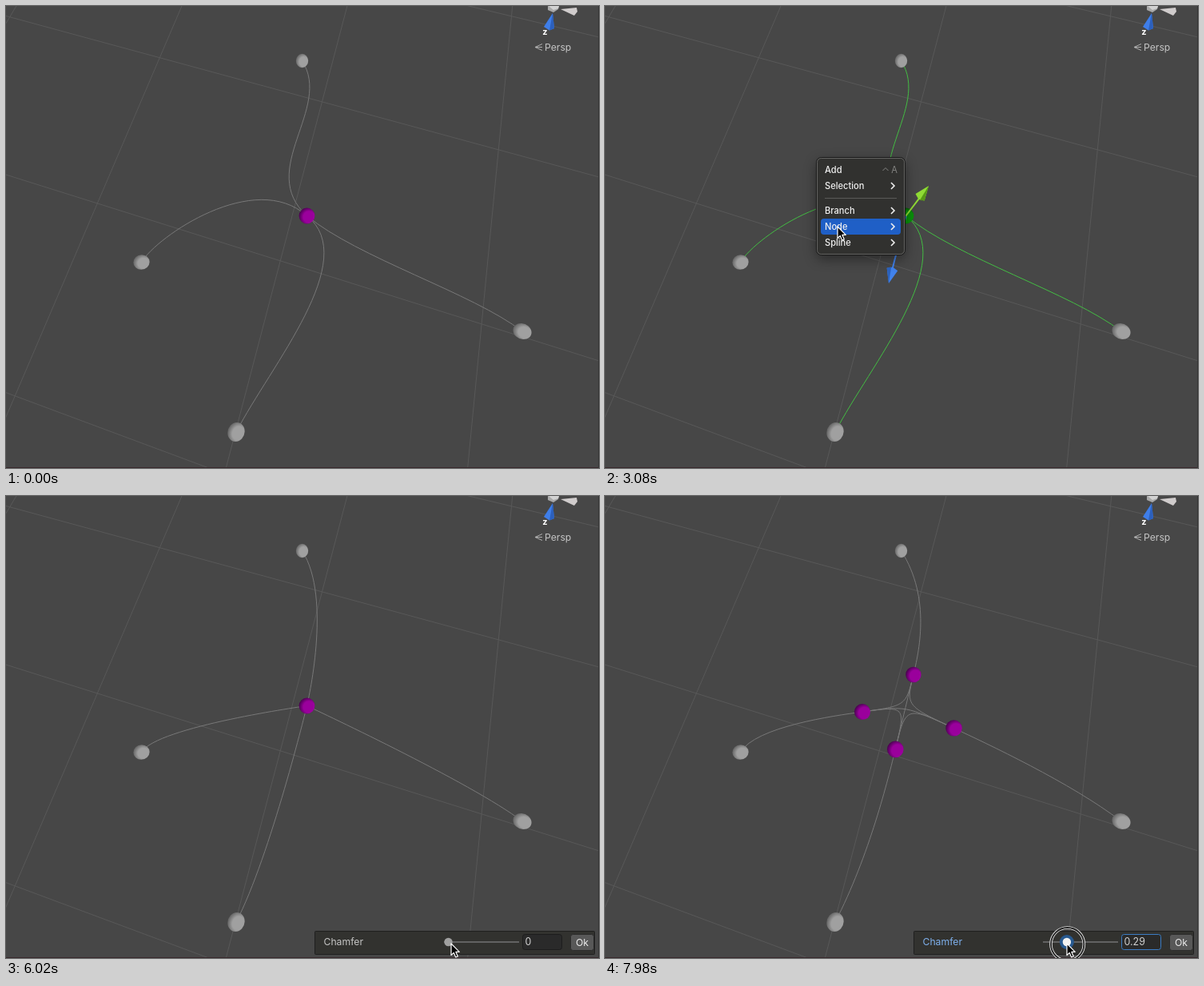
Write an HTML page with a canvas that moves like this. It is 742x578 px and loops after 8000 ms.

```html
<!DOCTYPE html>
<html lang="en">
<head>
<meta charset="utf-8">
<title>Chamfer a spline node</title>
<style>
  html, body { margin: 0; width: 100%; height: 100%; overflow: hidden; background: #474747; }
  canvas { display: block; width: 742px; height: 578px; }
</style>
</head>
<body>
<canvas id="stage"></canvas>
<script>
const W = 742, H = 578, LOOP = 8000, STEP = 70;
const canvas = document.getElementById('stage');
const ctx = canvas.getContext('2d');
const scale = window.devicePixelRatio || 1;
canvas.width = W * scale;
canvas.height = H * scale;

// Moments of the story, in ms.
const SHOW = 140, SELECT = 1330, MENU = 2100, SUBMENU = 3150, CHOOSE = 4340, PANEL = 4550, DRAG = 6300;

const HUB = [376.5, 262.5];
const BRANCHES = [
  { end: [370.5, 68.5], handle: [409, 128], hub: [313, 205] },
  { end: [646, 407], handle: [583.5, 359], hub: [440, 315] },
  { end: [288, 533], handle: [331, 450], hub: [445, 317] },
  { end: [169.5, 320.5], handle: [188.5, 288.5], hub: [311, 204] }
];

const SLIDER = { zero: 553.5, y: 558, length: 84 };
const MAIN_MENU = layout(265, 190, 110, ['Add ^A', 'Selection >', '', 'Branch >', 'Node >', 'Spline >']);
const NODE_MENU = layout(370, 261, 127, ['Type >', 'Flip Handles ^F', '', 'Normal', 'Speed', 'Scale', '',
  'Collapse ^C', 'Connect', 'Chamfer', 'Diffuse ^D', 'Compound', 'Break ^B']);

// Rows are 20 high; an empty entry is an 11 high separator.
function layout(x, y, w, entries) {
  let top = y + 5;
  const rows = entries.map(entry => {
    const [, label, hint] = entry.match(/^(.*?)(?: ([>^].?))?$/);
    const h = label ? 20 : 11;
    top += h;
    return { label, hint, y: top - h / 2 };
  });
  return { x, y, w, h: top + 5 - y, rows };
}

const mix = (a, b, k) => a.map((v, i) => v + (b[i] - v) * k);
const during = (t, from, to) => t >= from && t < to;
const ease = k => {
  k = Math.min(1, Math.max(0, k));
  return k * k * (3 - 2 * k);
};

function chamferAt(t) {
  const back = Math.max(0, t - 7350) / 630;
  return .5 * ease((t - 6330) / 950) - .21 * back * back;
}

function pointerAt(t) {
  if (t >= DRAG) return [SLIDER.zero + 3 + SLIDER.length * chamferAt(t + 50), 560];
  let at = [400, 388];
  const move = (from, to, x, y) => { at = mix(at, [x, y], ease((t - from) / (to - from))); };
  move(SHOW, 840, 355, 243);
  move(910, 1190, 398, 281);
  move(1470, 1750, 263, 188);
  move(2240, 3010, 291, 276);
  move(3430, 3710, 376, 278);
  move(3710, 3990, 415, 437);
  move(4480, 4760, 605, 437);
  move(4830, 5530, 557, 560);
  return at;
}

const pressed = t => during(t, 840, SELECT) || during(t, 2030, 2240) || during(t, 4270, 4410) || t >= DRAG;

function shape(points, fill) {
  ctx.beginPath();
  points.forEach(p => ctx.lineTo(...p));
  ctx.closePath();
  ctx.fillStyle = fill;
  ctx.fill();
}

function stroke(color, width = 1) {
  ctx.strokeStyle = color;
  ctx.lineWidth = width;
  ctx.stroke();
}

function line(x1, y1, x2, y2, color, width) {
  ctx.beginPath();
  ctx.moveTo(x1, y1);
  ctx.lineTo(x2, y2);
  stroke(color, width);
}

function curve(a, b, c, d, color) {
  ctx.beginPath();
  ctx.moveTo(...a);
  ctx.bezierCurveTo(...b, ...c, ...d);
  stroke(color);
}

function box(x, y, w, h, r, fill, edge) {
  ctx.beginPath();
  ctx.roundRect(x, y, w, h, r);
  if (fill) { ctx.fillStyle = fill; ctx.fill(); }
  if (edge) stroke(edge);
}

function disc(x, y, r, fill) {
  ctx.beginPath();
  ctx.arc(x, y, r, 0, 7);
  ctx.fillStyle = fill;
  ctx.fill();
}

function text(str, x, y, size, color, align = 'left', weight = 400) {
  ctx.font = `${weight} ${size}px Inter, sans-serif`;
  ctx.textAlign = align;
  ctx.fillStyle = color;
  ctx.fillText(str, x, y + size * .36);
}

// Spheres grow towards the viewer and stretch away from the middle of the view.
function ball([x, y], size, light, dark) {
  const dx = x - W / 2, dy = y - H / 2, r = (7.3 + .006 * y) * size;
  const angle = Math.atan2(dy, dx);
  ctx.save();
  ctx.translate(x, y);
  ctx.rotate(angle);
  ctx.scale(r * (1 + (dx * dx + dy * dy) / 410000), r);
  ctx.rotate(-angle);
  const g = ctx.createRadialGradient(.3, .15, 0, .25, .15, 1.3);
  g.addColorStop(0, light);
  g.addColorStop(.55, light);
  g.addColorStop(1, dark);
  disc(0, 0, 1, g);
  ctx.restore();
}

function arrow(from, to, light, dark) {
  const size = 18, angle = Math.atan2(to[1] - from[1], to[0] - from[0]);
  ctx.save();
  ctx.translate(...to);
  ctx.rotate(angle);
  line(-Math.hypot(to[0] - from[0], to[1] - from[1]), 0, -size, 0, light, 2);
  shape([[0, 0], [-size, -7], [-size - 3, 0], [-size, 7]], light);
  shape([[0, 0], [-size, 7], [-size - 3, 2]], dark);
  ctx.restore();
}

// The ground plane seen in perspective.
function ground(u, v) {
  const w = 1 - .0399 * u - .1217 * v;
  return [(187.4 * u - 91.9 * v + 192.3) / w, (50.4 * u + 152.2 * v + 64.7) / w];
}

function drawGround() {
  ctx.fillStyle = '#474747';
  ctx.fillRect(0, 0, W, H);
  for (let i = -1; i <= 2; i++) {
    line(...ground(i, -3), ...ground(i, 4), '#585858');
    line(...ground(-3, i), ...ground(4, i), '#585858');
  }
}

function drawOrientation() {
  shape([[678, 0], [692, 0], [691, 4], [685, 8], [678, 5]], '#a9a9a9');
  shape([[679, 0], [692, 0], [691, 3], [685, 5]], '#d2d2d2');
  shape([[694, 4], [714, 2], [715, 7], [711, 12]], '#d0cccc');
  shape([[684, 9], [686, 28], [680, 30.5], [673, 26]], '#3f7ee8');
  shape([[684, 9], [686, 28], [680, 30.5]], '#2c60bd');
  text('z', 674.5, 32, 11, '#ffffff', 'center', 700);
  for (const dy of [-4, 0, 4]) line(671, 51.5 + dy, 662, 51.5, '#b0b0b0');
  text('Persp', 674, 51.3, 12.2, '#c4c4c4');
}

function drawSpline(t, amount) {
  const flat = t >= PANEL, selected = during(t, SELECT, PANEL);
  const color = selected ? '#43bd43' : '#787878';
  const nodes = BRANCHES.map(b => mix(HUB, b.handle, amount));
  BRANCHES.forEach((b, i) =>
    curve(nodes[i], flat ? mix(HUB, b.handle, amount * 1.65) : b.hub, b.handle, b.end, color));
  if (amount > 0) nodes.forEach((a, i) =>
    nodes.slice(i + 1).forEach(b => curve(a, HUB, HUB, b, color)));
  BRANCHES.forEach(b => ball(b.end, 1, '#a0a0a0', '#626262'));
  const paint = selected ? ['#0a900a', '#034403'] : ['#9a009c', '#43004a'];
  (amount > 0 ? nodes : [HUB]).forEach(n => ball(n, 1.12, ...paint));
  if (selected) {
    arrow(HUB, [302, 268], '#db4a34', '#a93424');
    arrow(HUB, [355, 347], '#4182ec', '#2b62bd');
    arrow(HUB, [405, 225], '#90dc35', '#579a16');
  }
}

function drawMenu({ x, y, w, h, rows }, active, activeColor) {
  ctx.save();
  ctx.shadowColor = 'rgba(0,0,0,.45)';
  ctx.shadowBlur = 16 * scale;
  ctx.shadowOffsetY = 5 * scale;
  box(x, y, w, h, 6, '#31312f');
  ctx.restore();
  box(x - .5, y - .5, w + 1, h + 1, 6, null, '#191919');
  box(x + .5, y + .5, w - 1, h - 1, 5, null, '#646462');
  const right = x + w, dim = '#858583';
  for (const row of rows) {
    const { label, hint, y: cy } = row;
    if (!label) {
      line(x + 10, cy, right - 10, cy, '#5a5a58');
      continue;
    }
    if (row === active) box(x + 5, cy - 10, w - 10, 20, 4, activeColor);
    text(label, x + 10, cy, 11.1, '#f0f0f0', 'left', 500);
    if (hint === '>') {
      shape([], 'none');
      ctx.beginPath();
      ctx.moveTo(right - 17, cy - 4);
      ctx.lineTo(right - 13, cy);
      ctx.lineTo(right - 17, cy + 4);
      stroke('#eeeeee', 1.6);
    } else if (hint) {
      line(right - 27.5, cy + 1, right - 24, cy - 2.5, dim);
      line(right - 24, cy - 2.5, right - 20.5, cy + 1, dim);
      text(hint[1], right - 13, cy, 11.1, dim, 'center');
    }
  }
}

function hovered({ x, w, rows }, tip) {
  if (tip[0] < x || tip[0] > x + w) return null;
  return rows.find(row => row.label && Math.abs(row.y - tip[1]) <= 10);
}

function drawMenus(t, tip) {
  const open = t >= SUBMENU, inside = open && tip[0] > NODE_MENU.x;
  const parent = MAIN_MENU.rows.find(row => row.label === 'Node');
  const blue = '#1f5fc6', blink = during(t, CHOOSE, CHOOSE + STEP);
  drawMenu(MAIN_MENU, open ? parent : hovered(MAIN_MENU, tip), inside ? '#4a4a48' : blue);
  if (open) drawMenu(NODE_MENU, inside && !blink ? hovered(NODE_MENU, tip) : null, blue);
}

function drawPanel(t, amount) {
  const focus = t >= DRAG, { zero, y, length } = SLIDER, knob = zero + length * amount;
  box(386.5, 544.5, 350, 29, 1, '#32322f', '#1f1f1f');
  text('Chamfer', 397.5, y, 12.2, focus ? '#7fb1ee' : '#c6c6c6');
  line(548, y, 642, y, '#626262', 2);
  if (focus) disc(knob, y, 9, '#28598f');
  disc(knob, y, 5.2, focus ? '#f2f2f2' : '#a0a0a0');
  box(646.5, 548.5, 49, 19, 3, '#2a2a2a', focus ? '#3b7cc4' : '#1d1d1d');
  text(String(Math.round(amount * 100) / 100), 649.5, y, 12.4, '#d0d0d0');
  box(706.5, 548.5, 29, 20, 3, '#585858', '#2c2c2c');
  text('Ok', 721, y + .5, 12.2, '#eeeeee', 'center');
}

function drawRing([x, y]) {
  ctx.beginPath();
  ctx.arc(x + .7, y + .7, 20.7, 0, 7);
  stroke('#e4e4e4', 3.6);
  stroke('#202020', 1.8);
}

function drawPointer([x, y]) {
  ctx.save();
  ctx.translate(x, y);
  ctx.lineJoin = 'round';
  shape([[0, 0], [0, 14.5], [3.3, 11.4], [5.7, 17], [8.3, 15.9], [5.9, 10.4], [10.3, 10.3]], '#000000');
  stroke('#ffffff', 1.2);
  ctx.restore();
}

function draw(t) {
  const amount = chamferAt(t), tip = pointerAt(t);
  ctx.setTransform(scale, 0, 0, scale, 0, 0);
  drawGround();
  drawSpline(t, amount);
  drawOrientation();
  if (during(t, 910, SELECT)) {
    ctx.fillStyle = 'rgba(24,24,24,.25)';
    ctx.fillRect(355, 243, tip[0] - 354, tip[1] - 242);
  }
  if (during(t, MENU, PANEL)) drawMenus(t, tip);
  if (t >= PANEL) drawPanel(t, amount);
  line(0, 577.5, W, 577.5, '#38282c');
  line(741.5, 0, 741.5, H, '#353535');
  if (pressed(t)) drawRing(tip);
  if (t >= SHOW) drawPointer(tip);
}

const start = performance.now();
function tick() {
  const t = (performance.now() - start) % LOOP;
  draw(Math.floor(t / STEP) * STEP);
  requestAnimationFrame(tick);
}
tick();
</script>
</body>
</html>
```
